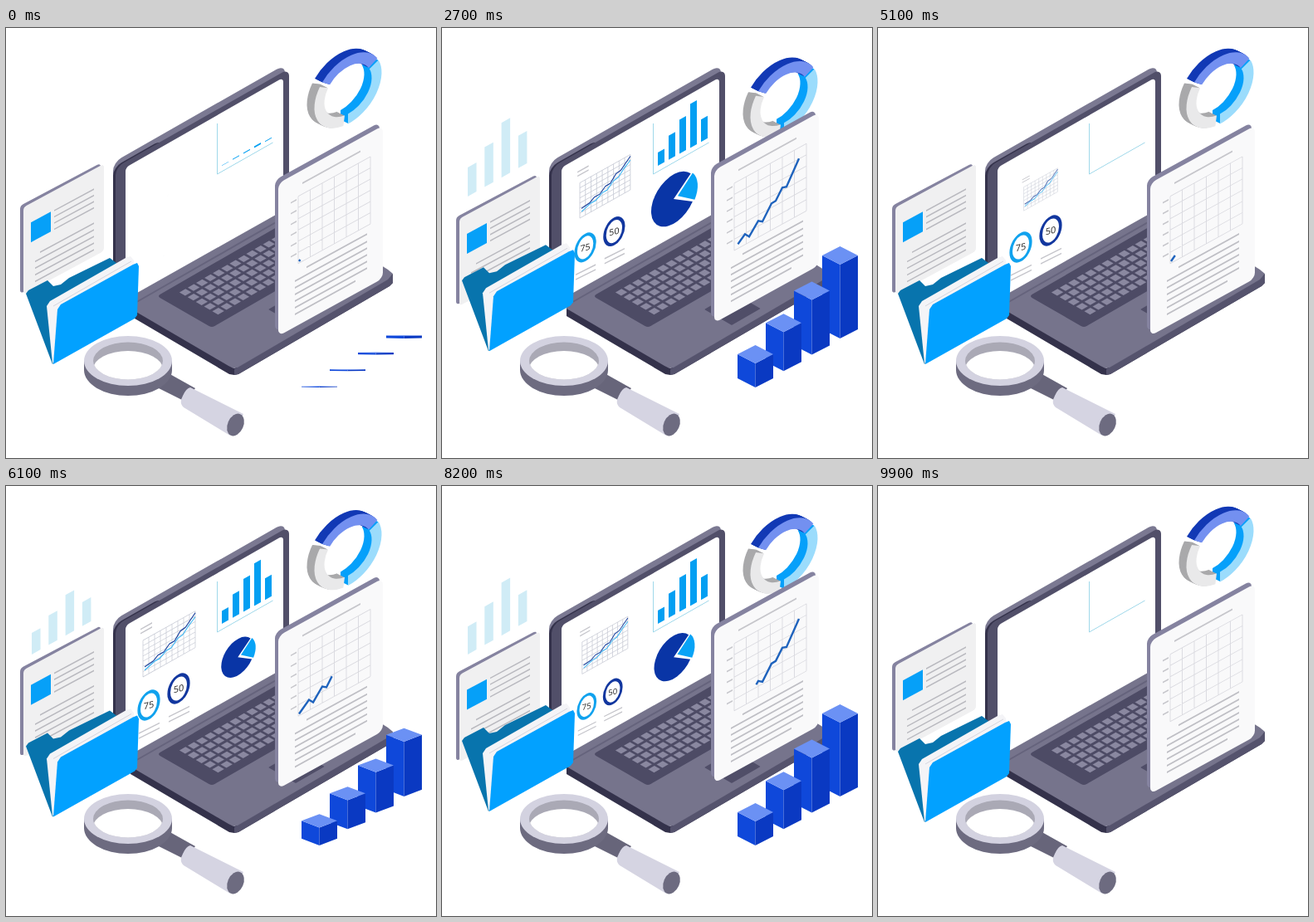
Recreate the animation shown at these times as an HTML page. Size 518 by 518 pixels, loop 10 s.

```html
<!DOCTYPE html>
<html lang="en">
<head>
<meta charset="utf-8">
<title>Isometric analytics</title>
<style>
html, body { margin: 0; width: 100%; height: 100%; overflow: hidden; background: #fff; }
svg { display: block; width: 100%; height: 100%; }
text { font: 11px "Open Sans", Arial, sans-serif; text-anchor: middle; fill: #222; }
</style>
</head>
<body>
<svg id="stage" viewBox="0 0 518 518"></svg>
<script>
const LOOP = 10000, FLOAT = 5000, STEP = 100, FADE = 900;
const stage = document.getElementById('stage');

// Markup helpers
const poly = (points, fill) => `<polygon points="${points}" fill="${fill}"/>`;
const rect = (x, y, w, h, fill, r = 0) =>
  `<rect x="${x}" y="${y}" width="${w}" height="${h}" rx="${r}" fill="${fill}"/>`;
const stroke = (d, color, width, extra = '') =>
  `<path d="${d}" fill="none" stroke="${color}" stroke-width="${width}" ${extra}/>`;
const ellipse = (x, y, rx, ry, fill) =>
  `<ellipse cx="${x}" cy="${y}" rx="${rx}" ry="${ry}" fill="${fill}"/>`;
const group = (id, body) => `<g id="${id}">${body}</g>`;
// Upright isometric plane with its origin at x, y
const wall = (x, y, body, slope = .56) =>
  `<g transform="matrix(1 ${-slope} 0 1 ${x} ${y})">${body}</g>`;
const floor = (x, y, body) =>
  `<g transform="matrix(.868 -.5 .868 .5 ${x} ${y})">${body}</g>`;

function rows(x, y, w, gap, n) {
  let d = '';
  for (let i = 0; i < n; i++) d += `M${x} ${y + i * gap}h${w}`;
  return d;
}

function grid(x, y, w, h, cols, lines) {
  let d = rows(x, y, w, h / lines, lines + 1);
  for (let i = 0; i <= cols; i++) d += `M${x + i * w / cols} ${y}v${h}`;
  return d;
}

function polar(r, deg, ratio = 1) {
  const a = deg * Math.PI / 180;
  return `${(r * Math.cos(a)).toFixed(2)} ${(r * ratio * Math.sin(a)).toFixed(2)}`;
}

function arc(r, from, to, ratio = 1) {
  return `${polar(r, from, ratio)}A${r} ${r * ratio} 0 ${to - from > 180 ? 1 : 0} 1 ${polar(r, to, ratio)}`;
}

function laptop() {
  let keys = '';
  for (let row = 0; row < 5; row++)
    for (let col = 0; col < 14; col++)
      keys += `M${20 + col * 11.6} ${11 + row * 11.4}h8.500v8h-8.500z`;
  return wall(129, 162, rect(0, 0, 207, 182, '#7b7992', 10), .57)
    + wall(129, 168, rect(0, 0, 60, 178, '#34324b', 10), .57)
    + wall(132, 168, rect(0, 0, 209, 177, '#514f69', 9), .57)
    + wall(144, 168, rect(0, 0, 190, 164, '#fff', 5), .57)
    + poly('150,336 275,410 466,296 466,307 462,311 280,417 275,418 269,417 150,347', '#34324b')
    + poly('275,411 466,297 466,307 462,311 280,417 275,418', '#55536d')
    + poly('150,338 158,319 341,216 460,291 466,296 460,303 279,409 274,410 268,407', '#76748c')
    + stroke('M154 332L341 225', '#65637c', 2)
    + floor(182, 323, rect(0, 0, 190, 76, '#4d4b65', 4) + `<path d="${keys}" fill="#8a88a0"/>`)
    + floor(316, 339, rect(0, 0, 40, 38, '#504e68', 1));
}

function screenBars() {
  const heights = [16, 29, 41, 53, 27];
  return stroke('M254.500 115v61l67-38', '#9fd8ea', 1)
    + heights.map((h, i) => wall(260 + i * 13, 166 - i * 7.2,
      `<g class="tiny">${rect(0, -h, 8, h, '#039ff2')}</g>`)).join('');
}

function lineChart() {
  return wall(165, 186,
    stroke(rows(-3, -15, 14, 5, 2), '#c4c4ca', 1.6)
    + stroke(grid(0, 0, 63, 44, 9, 7), '#c9ccd6', .8)
    + stroke('M2 37L14 33 20 33 28 28 34 28 42 21 48 20 55 13 63 7', '#35b5f5', 1.4)
    + stroke('M2 33L12 32 18 28 25 28 32 22 38 22 45 14 51 13 63 2', '#173f9e', 1.4));
}

function gauges() {
  const gauge = (x, y, label, color) => wall(x, y,
    `<ellipse rx="11.800" ry="15.500" fill="#fff" stroke="${color}" stroke-width="3.600"/>`
    + `<text y="4" transform="skewY(14)">${label}</text>`
    + stroke(rows(-12, 28, 25, 6, 2), '#c4c4ca', 1.6), .5);
  return gauge(172, 264, '75', '#10a2ee') + gauge(208, 244, '50', '#12379f');
}

function pie() {
  return wall(279, 206,
    `<path d="M0 0L${arc(27, 32, 320, 1.1)}z" fill="#0935a6"/>`
    + `<path d="M3 -1L${arc(27, -39, 30, 1.1)}z" fill="#08a3f6" transform="translate(2 0)"/>`);
}

function leftBars() {
  return [35, 48, 66, 39].map((h, i) => wall(31 + i * 20.3, 203 - i * 11.4,
    `<g class="pale">${rect(0, -h, 10.500, h, '#d0ecf6')}</g>`)).join('');
}

function leftPaper() {
  return wall(17, 214, rect(0, 0, 97, 106, '#8583a0', 4), .53)
    + wall(21, 216, rect(0, 0, 97, 105, '#f0f0f1', 4)
      + rect(9, 23, 24, 24, '#06a0f8')
      + stroke(rows(37, 24, 48, 7.5, 4), '#b9b9bf', 1.7)
      + stroke('M20 65h65' + rows(14, 73, 71, 8, 4), '#b9b9bf', 1.7), .54);
}

function folder() {
  return poly('24,320 27,316 50,304 57,311 66,309 76,301 125,277 133,283 134,320 56,405', '#0874ad')
    + poly('49,335 53,329 144,277 150,275 154,280 154,310 56,404', '#f4f4f7')
    + stroke('M57 335L151 281', '#d5d5de', 1)
    + poly('62,339 66,333 153,285 158,283 160,287 158,346 155,350 57,405', '#02a1ff');
}

function rightPaper() {
  const trend = 'M353 281L365 264 370 267 381 248 386 249 397 227 402 224 410 208 415 207 430 173';
  return wall(324, 188, rect(0, -5, 126, 183, '#8583a0', 7), .55)
    + wall(328, 192, rect(0, -5, 126, 184, '#f9f9fa', 7)
      + stroke('M29 11h70', '#c6c6cb', 2)
      + stroke(rows(15, 27, 7, 13, 6), '#c6c6cb', 1.7)
      + stroke(grid(24, 24, 87, 81, 6, 6), '#d9d9df', .9)
      + stroke('M34 115h73' + rows(20, 124, 87, 8, 5) + 'M20 164h73', '#bfbfc5', 2), .55)
    + stroke(trend, '#1f63bd', 2.4, 'id="trend" pathLength="1"');
}

function ring() {
  const parts = [
    [98, 213, '#a9a9ab', '#e9e9ea'],
    [-25, 90, '#06a0fa', '#9bdcfc'],
    [-140, -29, '#1239b5', '#7390f0']
  ];
  const layer = (k, shade) => wall(412 - k, 75 - k / 2,
    parts.map(p => stroke('M' + arc(34.5, p[0], p[1]), p[shade], 12)).join(''), .53);
  let body = '';
  for (let k = 9; k > 0; k--) body += layer(k, 2);
  return body + layer(0, 3);
}

function towers() {
  return [29, 47, 66, 89].map((h, i) =>
    `<g transform="translate(${377.5 + i * 34} ${433 - i * 19.7})"><g class="tower">`
    + poly(`-21.500,-11 0,0 0,${-h} -21.500,${-h - 11}`, '#0f48da')
    + poly(`21.500,-11 0,0 0,${-h} 21.500,${-h - 11}`, '#0a39c2')
    + poly(`0,${-h} -21.500,${-h - 11} 0,${-h - 22} 21.500,${-h - 11}`, '#6b91f4')
    + '</g></g>').reverse().join('');
}

function magnifier() {
  const hole = 'M105 401a42 22.500 0 1 0 84 0a42 22.500 0 1 0 -84 0z';
  return poly('184,423 194,415 228,434 216,450 184,434', '#67657a')
    + `<path d="M94 401v11a53 31 0 0 0 106 0v-11z" fill="#6d6b80"/>`
    + ellipse(147, 401, 53, 30, '#d3d2e0')
    + `<path d="${hole}" fill="#aaa9b5"/>`
    + `<clipPath id="hole"><path d="${hole}"/></clipPath>`
    + `<g clip-path="url(#hole)">${ellipse(147, 411, 42, 22, '#fff')}</g>`
    + `<path d="M222 433L286 465 270 491 214 457Q208 452 213 443 217 434 222 433z" fill="#d5d4e2"/>`
    + `<ellipse rx="9.500" ry="14" transform="translate(276.500 478) rotate(24)" fill="#6d6b80"/>`;
}

stage.innerHTML = leftBars() + group('left', leftPaper()) + laptop()
  + screenBars() + group('chart', lineChart()) + group('gauges', gauges()) + group('pie', pie())
  + group('folder', folder()) + group('ring', ring())
  + group('right', rightPaper()) + towers() + magnifier();

const find = id => document.getElementById(id);
const move = (id, y) => find(id).setAttribute('transform', `translate(0 ${y.toFixed(2)})`);
const clamp = x => Math.max(0, Math.min(1, x));
const smooth = x => (x = clamp(x), x * x * (3 - 2 * x));

// Each span grows from its start and has shrunk away by its end.
const level = (t, ...spans) => Math.max(...spans.map(([start, end]) =>
  Math.min(smooth((t - start) / FADE), smooth((end - t) / FADE))));

function grow(id, x, y, s) {
  const el = find(id);
  el.setAttribute('transform', `translate(${x} ${y}) scale(${s}) translate(${-x} ${-y})`);
  el.setAttribute('opacity', Math.min(1, s * 1.4));
}

function stretch(name, s) {
  for (const el of stage.getElementsByClassName(name)) el.setAttribute('transform', `scale(1 ${s})`);
}

function draw(t) {
  const phase = t % FLOAT;
  const lift = 1 - Math.cos(2 * Math.PI * phase / FLOAT);
  move('right', -8 * lift);
  move('folder', -8 * lift);
  move('left', 7 * lift);
  move('ring', 5.5 * lift);

  const head = clamp((phase + 40) / 2400), tail = clamp((phase - 2620) / 1920);
  const trend = find('trend');
  trend.setAttribute('stroke-dasharray', `0 ${tail} ${head - tail} 2`);
  trend.setAttribute('visibility', head > tail ? 'visible' : 'hidden');

  stretch('tower', level(t, [-100, 4100], [5500, 9660]));
  stretch('tiny', level(t, [-100, 4110], [5300, 9210]));
  stretch('pale', level(t, [0, 3960], [5500, 9000]));
  grow('pie', 280, 207, level(t, [100, 3960], [5500, 8900]));
  grow('chart', 195, 202, level(t, [-100, 3500], [4560, 8900]));
  grow('gauges', 190, 275, level(t, [-100, 3500], [4150, 8900]));
}

const begin = performance.now();
function tick() {
  const t = (performance.now() - begin) % LOOP;
  draw(Math.floor(t / STEP) * STEP);
  requestAnimationFrame(tick);
}
tick();
</script>
</body>
</html>
```
